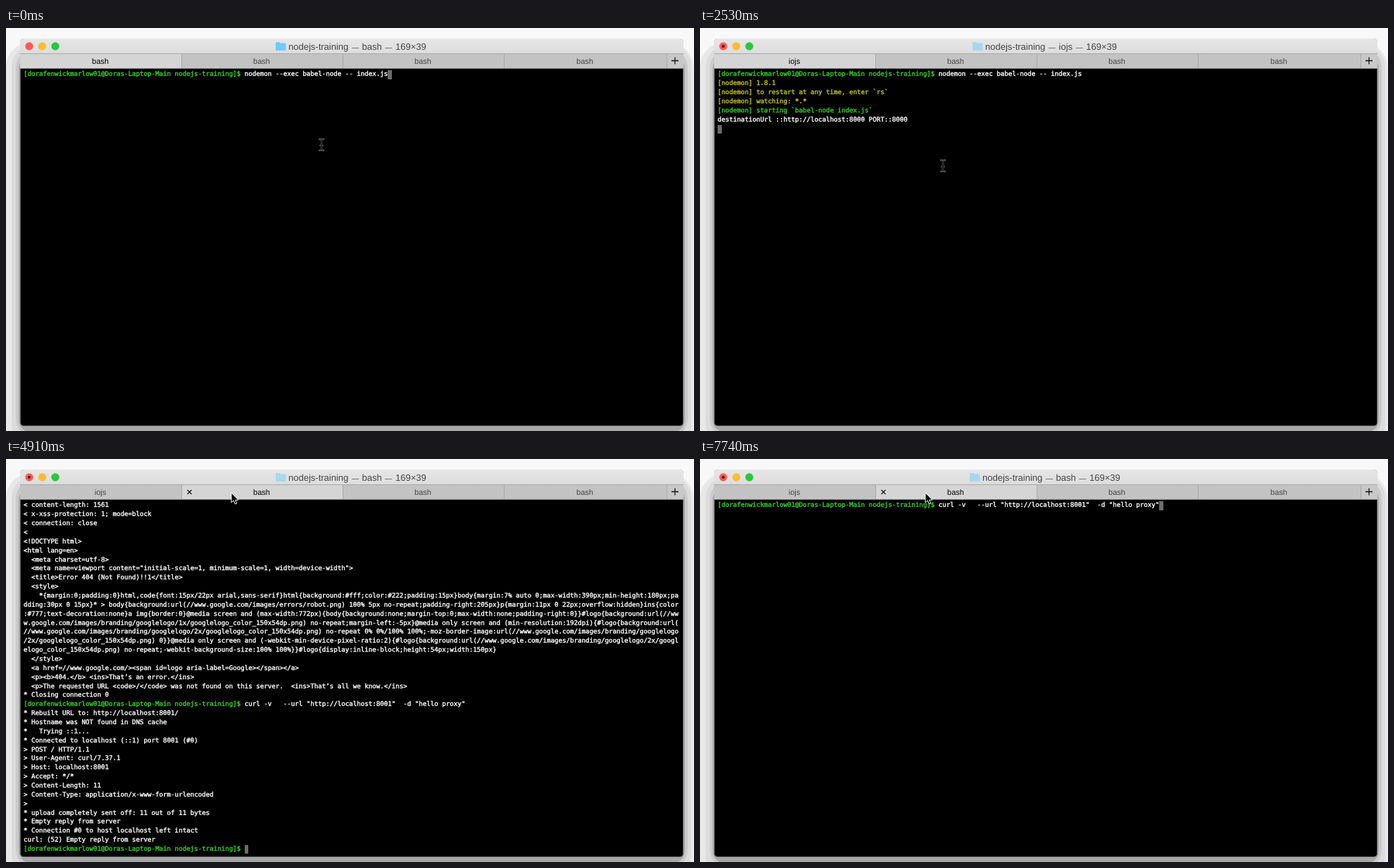
Write an HTML page that moves like this. It is 977x573 px and loops after 8000 ms.

```html
<!DOCTYPE html>
<html lang="en">
<head>
<meta charset="utf-8">
<title>Terminal session</title>
<style>
html, body { margin: 0; width: 100%; height: 100%; overflow: hidden; background: #f8f8f8; }
svg { display: block; }
text { font-family: "Liberation Sans", Arial, sans-serif; text-rendering: geometricPrecision; }
.tab text { font-size: 11px; text-anchor: middle; fill: #444; }
.tab rect { fill: #c3c3c3; }
.tab.hover rect { fill: #b7b7b7; }
.tab.active rect { fill: #d5d5d5; }
.tab.active text { fill: #000; }
#title { font-size: 13px; fill: #444; word-spacing: 1px; }
#title .dash { font-size: 10px; }
#screen {
  font: 9.157px/12.87px "DejaVu Sans Mono", monospace; color: #fff; white-space: pre;
  text-rendering: geometricPrecision; -webkit-text-stroke: .4px; font-variant-ligatures: none;
}
#screen div { height: 12.87px; }
.green { color: #32d423; }
.yellow { color: #c5c21f; }
#screen i { display: inline-block; width: 1ch; height: 12.4px; vertical-align: top; background: #6c6c6c; }
</style>
</head>
<body>
<svg width="977" height="573" viewBox="0 0 977 573">
  <defs>
    <linearGradient id="bar" x2="0" y2="1">
      <stop stop-color="#e6e6e6"/><stop offset=".45" stop-color="#dedede"/>
      <stop offset=".6" stop-color="#d6d6d6"/><stop offset="1" stop-color="#d1d1d1"/>
    </linearGradient>
    <path id="beamShape" d="M-3-8q3 0 3 2.500V5.500Q0 8-3 8M3-8Q0-8 0-5.500V5.500Q0 8 3 8M-1.500 1h3"/>
  </defs>
  <rect x="0" y="21" width="976" height="590" rx="34" fill="#e8e8e8"/>
  <rect x="8" y="25" width="965" height="568" rx="30" fill="#dcdcdc"/>
  <rect x="14" y="30" width="954" height="552" rx="26" fill="#cacaca"/>
  <rect x="18" y="40" width="946" height="535" rx="18" fill="#a8a8a8"/>
  <rect x="20" y="15" width="942" height="551" rx="5" fill="#555"/>
  <path d="M20 57V20q0-5 5-5H957q5 0 5 5V57z" fill="url(#bar)"/>
  <path d="M21 58H961V561q0 4-4 4H25q-4 0-4-4z"/>
  <circle cx="33" cy="26" r="5.700" fill="#fc5b57"/>
  <circle cx="51.500" cy="26" r="5.700" fill="#fdbd2e"/>
  <circle cx="70" cy="26" r="5.700" fill="#28c83f"/>
  <circle id="dot" cx="33" cy="26" r="2" fill="#4d0000"/>
  <g id="heading">
    <path id="folder" d="M-18 21q0-1 1-1h4l1.500 1.500h7q1 0 1 1V31q0 1-1 1H-17q-1 0-1-1z"/>
    <text id="title" y="30.500">nodejs-training <tspan class="dash">—</tspan> <tspan id="job"></tspan> <tspan class="dash">—</tspan> 169×39</text>
  </g>
  <g id="tabs"></g>
  <path d="M939 37h23v20h-23z" fill="#c8c8c8"/>
  <path d="M20 36.500H962M249.500 37V57M478.500 37V57M707.500 37V57M938.500 37V57" stroke="#a9a9a9"/>
  <path d="M20 57.500H962" stroke="#8a8a8a"/>
  <path d="M945 46.500h10M950 41.500v10" stroke="#111" stroke-width="1.300"/>
  <path id="close" d="M257.500 44l6 6m0-6l-6 6" stroke="#111" stroke-width="1.200"/>
  <foreignObject x="25" y="60.400" width="936" height="504"><div id="screen"></div></foreignObject>
  <g id="beam" fill="none" stroke-linecap="round">
    <use href="#beamShape" stroke="#6c6c6c" stroke-width="2.400"/>
    <use href="#beamShape" stroke="#111" stroke-width=".9"/>
  </g>
  <path id="arrow" d="M0 0V14l3.200-3 2.200 5 2.400-1-2.100-4.800H10z" stroke="#fff"/>
</svg>
<script>
const LOOP = 8000;
const $ = id => document.getElementById(id);
const escape = s => s.replace(/</g, '&lt;');
const paint = (color, s) => `<span class="${color}">${escape(s)}</span>`;
const prompt = (cmd = '') =>
  paint('green', '[dorafenwickmarlow01@Doras-Laptop-Main nodejs-training]$ ') + escape(cmd);

// Server session
const start = prompt('nodemon --exec babel-node -- index.js');
const notes = ['1.8.1', 'to restart at any time, enter `rs`', 'watching: *.*']
  .map(s => paint('yellow', '[nodemon] ' + s));
const running = [start, ...notes, paint('green', '[nodemon] starting `babel-node index.js`')];
const listening = [...running, 'destinationUrl ::http://localhost:8000 PORT::8000', ''];

// Request session
const curl = 'curl -v   --url "http://localhost:8001"  -d "hello proxy"';
const site = '//www.google.com/';
const image = path => `url(${site}images/${path}.png)`;
const logo = n => image(`branding/googlelogo/${n}x/googlelogo_color_150x54dp`);
const css = '    *{margin:0;padding:0}html,code{font:15px/22px arial,sans-serif}' +
  'html{background:#fff;color:#222;padding:15px}body{margin:7% auto 0;max-width:390px;min-height:180px;' +
  `padding:30px 0 15px}* > body{background:${image('errors/robot')} 100% 5px no-repeat;padding-right:205px}` +
  'p{margin:11px 0 22px;overflow:hidden}ins{color:#777;text-decoration:none}a img{border:0}' +
  '@media screen and (max-width:772px){body{background:none;margin-top:0;max-width:none;padding-right:0}}' +
  `#logo{background:${logo(1)} no-repeat;margin-left:-5px}` +
  `@media only screen and (min-resolution:192dpi){#logo{background:${logo(2)} no-repeat 0% 0%/100% 100%;` +
  `-moz-border-image:${logo(2)} 0}}@media only screen and (-webkit-min-device-pixel-ratio:2){` +
  `#logo{background:${logo(2)} no-repeat;-webkit-background-size:100% 100%}}` +
  '#logo{display:inline-block;height:54px;width:150px}';
const response = [
  ...`< content-length: 1561
< x-xss-protection: 1; mode=block
< connection: close
<
<!DOCTYPE html>
<html lang=en>
  <meta charset=utf-8>
  <meta name=viewport content="initial-scale=1, minimum-scale=1, width=device-width">
  <title>Error 404 (Not Found)!!1</title>
  <style>`.split('\n'),
  ...css.match(/.{1,169}/g),
  ...`  </style>
  <a href=${site}><span id=logo aria-label=Google></span></a>
  <p><b>404.</b> <ins>That’s an error.</ins>
  <p>The requested URL <code>/</code> was not found on this server.  <ins>That’s all we know.</ins>
* Closing connection 0`.split('\n')
].map(escape);
const exchange = `* Rebuilt URL to: http://localhost:8001/
* Hostname was NOT found in DNS cache
*   Trying ::1...
* Connected to localhost (::1) port 8001 (#0)
> POST / HTTP/1.1
> User-Agent: curl/7.37.1
> Host: localhost:8001
> Accept: */*
> Content-Length: 11
> Content-Type: application/x-www-form-urlencoded
>
* upload completely sent off: 11 out of 11 bytes
* Empty reply from server
* Connection #0 to host localhost left intact
curl: (52) Empty reply from server`.split('\n');
const log = cmd => [...response, prompt(curl), ...exchange, prompt(cmd)];

// [time, lines]
const screens = [
  [0, [start]],
  [740, [start, '']],
  [890, [start, ...notes, '']],
  [1040, [...running, '']],
  [1790, listening],
  [4910, log()],
  [5800, log('c')],
  [5950, log('cle')],
  [6100, log('clear')],
  [6400, [prompt()]],
  [6850, [prompt('clear')]],
  [7000, [prompt(curl)]],
  [7150, [prompt(curl + ' -H "x-destination-url:http://example.com"')]],
  [7740, [prompt(curl)]]
];

// [time, x, y, over the tab bar]
const pointer = [
  [0, 448, 166], [1790, 441, 180], [1940, 432, 196], [2090, 420, 207], [2240, 403, 210],
  [2385, 378, 207], [2530, 345, 196], [2675, 295, 170], [2820, 243, 132], [2970, 275, 110],
  [3120, 298, 94], [3270, 316, 80], [3420, 320, 50, true], [3570, 322, 63], [3870, 322, 61],
  [4460, 320, 50, true], [4610, 320, 48, true]
];

const at = (list, t) => list.findLast(item => item[0] <= t);
const move = (el, x, y) => el.setAttribute('transform', `translate(${x} ${y})`);
const show = (el, on) => { el.style.display = on ? '' : 'none'; };

const tabs = [[20, 249, 134], [250, 478, 363], [479, 707, 592], [708, 938, 822]];
$('tabs').innerHTML = tabs.map(([left, right, mid]) =>
  `<g class="tab"><rect x="${left}" y="37" width="${right - left}" height="20"/><text x="${mid}" y="50.500">bash</text></g>`).join('');
const tabNodes = [...$('tabs').children];

let shown;
function draw() {
  const t = performance.now() % LOOP;
  const screen = at(screens, t);
  if (screen !== shown) {
    shown = screen;
    $('screen').innerHTML = screen[1]
      .map((s, i, all) => `<div>${s}${i === all.length - 1 ? '<i></i>' : ''}</div>`).join('');
  }

  const [, x, y, onTab] = at(pointer, t);
  show($('beam'), !onTab);
  show($('arrow'), onTab);
  move($('beam'), x, y);
  move($('arrow'), x, y);

  const started = t >= 740, second = t >= 4910;
  const job = started && !second ? 'iojs' : 'bash';
  $('job').textContent = job;
  move($('heading'), job === 'iojs' ? 405 : 401, 0);
  $('folder').setAttribute('fill', started ? '#a6d6f0' : '#6ecbf8');
  show($('dot'), started);
  show($('close'), onTab);
  tabNodes[0].lastChild.textContent = started ? 'iojs' : 'bash';
  tabNodes.forEach((tab, i) => {
    tab.classList.toggle('active', i === +second);
    tab.classList.toggle('hover', i === 1 && !!onTab);
  });
  requestAnimationFrame(draw);
}
draw();
</script>
</body>
</html>
```
